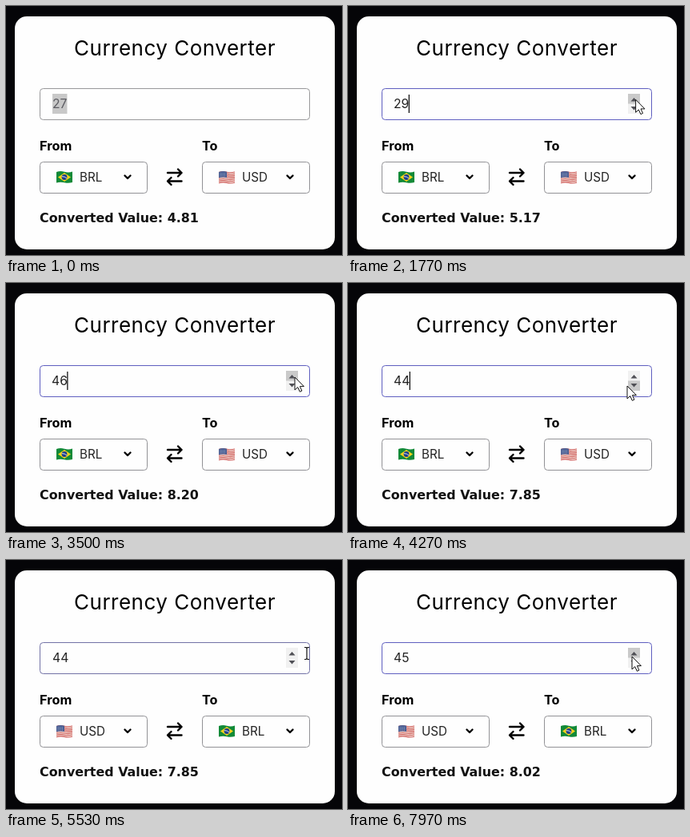
Animation, 420 px wide and 312 px high, one loop 8000 ms. Source, as an HTML page:

```html
<!DOCTYPE html>
<html lang="en">
<head>
<meta charset="utf-8">
<title>Currency Converter</title>
<style>
  html, body { margin: 0; width: 100%; height: 100%; overflow: hidden; background: #050508; }
  svg { display: block; width: 420px; height: 312px; }
  text { font-family: Inter, "Open Sans", sans-serif; fill: #111; white-space: pre; }
  .title { font-size: 26px; font-weight: 430; letter-spacing: .5px; text-anchor: middle; fill: #000; }
  .label { font-size: 16.3px; font-weight: 700; fill: #000; }
  .code { font-size: 15.2px; fill: #222; }
  .amount { font-size: 15.7px; }
  .result { font: bold 15.9px "DejaVu Sans", sans-serif; }
  .box { fill: none; stroke: #929296; }
  .line { fill: none; stroke: #000; stroke-width: 2.4; stroke-linecap: round; stroke-linejoin: round; }
</style>
</head>
<body>
<svg viewBox="0 0 420 312">
  <defs>
    <g id="brl">
      <path d="M0 1Q5 -1 10 .7T20 .5V14Q15 15.5 10 14.3T0 14.5Z" fill="#128a38"/>
      <path d="M2 7.5L10 2L18 7.5L10 13Z" fill="#f8d21c"/>
      <circle cx="10" cy="7.5" r="3.4" fill="#1d3f8c"/>
      <path d="M6.9 6.6Q10.5 6.4 13 9" fill="none" stroke="#f2f2f2" stroke-width=".9"/>
    </g>
    <g id="usd">
      <path d="M0 1Q5 -1 10 .7T20 .5V14Q15 15.5 10 14.3T0 14.5Z" fill="#f3e4dc"/>
      <g id="stripes" fill="none" stroke="#cf5a58" stroke-width="1.15"></g>
      <path d="M0 1Q5 -1 10 .7V8Q5 7 0 8.3Z" fill="#4a5f94"/>
      <path d="M1.5 2.8H9M1.5 4.6H9M1.5 6.4H9" stroke="#c3cbdc" stroke-width=".7" stroke-dasharray=".8 1.1"/>
    </g>
  </defs>

  <rect width="420" height="312" fill="#050508"/>
  <rect x="11" y="13" width="400" height="292" rx="15" fill="#fefefe"/>
  <text class="title" x="211" y="62">Currency Converter</text>

  <rect id="field" class="box" x="42.5" y="103.5" width="337" height="39" rx="4"/>
  <rect id="mark" y="110" height="25"/>
  <text id="amount" class="amount" y="128"></text>
  <path id="caret" d="M0 111V134" stroke="#000" stroke-width="1.2"/>

  <g id="spinner">
    <rect x="350" y="110" width="15" height="25" fill="#f1f1f1"/>
    <rect id="hover" x="350" width="15" height="12.5" fill="#cacaca"/>
    <path d="M353.5 119.5L357.5 115L361.5 119.5ZM353.5 126L357.5 130.5L361.5 126Z" fill="#505056"/>
  </g>

  <text class="label" x="42" y="181">From</text>
  <text class="label" x="245" y="181">To</text>

  <g id="from">
    <rect class="box" x="42.5" y="195.5" width="134" height="39" rx="4"/>
    <use x="63" y="207"/>
    <text class="code" x="92" y="220"></text>
    <path class="line" d="M148.5 212.5L152 216L155.5 212.5"/>
  </g>
  <g id="to" transform="translate(203 0)">
    <rect class="box" x="42.5" y="195.5" width="134" height="39" rx="4"/>
    <use x="63" y="207"/>
    <text class="code" x="92" y="220"></text>
    <path class="line" d="M148.5 212.5L152 216L155.5 212.5"/>
  </g>

  <path class="line" d="M202 209H219.5M215 204.5L219.5 209L215 213.5M219.5 219.5H202M206.5 215L202 219.5L206.5 224"/>
  <text id="result" class="result" x="42" y="271"></text>

  <g id="pointer">
    <path id="arrow" d="M0 0V16L3.7 12.6L6.3 18.3L8.9 17.1L6.4 11.6H11.4Z" fill="#fff" stroke="#111"/>
    <path id="beam" d="M-3 -7.5H-1L0 -6.5L1 -7.5H3M0 -6.5V6.5M-3 7.5H-1L0 6.5L1 7.5H3" fill="none" stroke="#111" stroke-width="1.2"/>
    <path id="hand" d="M-1.5 1Q0 -1 1.5 1V6L8 7.5Q10 8 9.5 11L8 17H0L-5 10Q-5 8 -3.5 8.5L-1.5 10Z" fill="#fff" stroke="#111"/>
  </g>
</svg>
<script>
const LOOP = 8000;
const RATE = 0.1783;
const ACTIVE = 450, SWAP = 4850, REFOCUS = 6230, BLINK = 530;
const $ = id => document.getElementById(id);
const show = (el, on) => el.setAttribute("visibility", on ? "visible" : "hidden");

// Spinner presses: [time, step]
const presses = [
  ...Array.from({ length: 5 }, (_, i) => [1500 + i * 200, 1]),
  ...Array.from({ length: 14 }, (_, i) => [2570 + i * 70, 1]),
  [3800, -1], [4050, -1], [REFOCUS, 1]
];

// Pointer stops: [time, x, y]
const stops = [
  [350, 432, 66], [1000, 361, 111.5], [1150, 361, 111.5], [1400, 359, 117],
  [2400, 361, 118], [3520, 361, 118], [3720, 354, 127], [4050, 352, 128],
  [4270, 349, 129], [4700, 210, 214], [4980, 210, 214], [5450, 376, 117],
  [5570, 376, 117], [5950, 354, 122.5], [6750, 354, 122.5], [7700, 355, 121]
];

for (let y = 1.2; y < 15; y += 2.2) {
  const stripe = document.createElementNS("http://www.w3.org/2000/svg", "path");
  stripe.setAttribute("d", `M0 ${y + 0.3}Q5 ${y - 1.2} 10 ${y}T20 ${y - 0.2}`);
  $("stripes").append(stripe);
}

function pointerAt(t) {
  const i = stops.findIndex(s => s[0] > t);
  if (i === 0) return stops[0].slice(1);
  if (i < 0) return stops[stops.length - 1].slice(1);
  const [t0, x0, y0] = stops[i - 1], [t1, x1, y1] = stops[i];
  const p = (t - t0) / (t1 - t0), k = p * p * (3 - 2 * p);
  return [x0 + (x1 - x0) * k, y0 + (y1 - y0) * k];
}

const within = (x, y, l, t, r, b) => x >= l && x <= r && y >= t && y <= b;

function setCurrency(id, code) {
  $(id).querySelector("use").setAttribute("href", "#" + code.toLowerCase());
  $(id).querySelector("text").textContent = code;
}

function drawAmount(t, focused) {
  const done = presses.filter(p => p[0] <= t);
  const value = done.reduce((sum, p) => sum + p[1], 27);
  const left = focused ? 57 : 58;
  const selected = !done.length;
  const text = $("amount");
  text.textContent = value;
  text.setAttribute("x", left);
  text.style.fill = !selected ? "#222" : focused ? "#f8f8fa" : "#5c5c62";
  const width = text.getComputedTextLength();

  show($("mark"), selected);
  $("mark").setAttribute("x", left);
  $("mark").setAttribute("width", width);
  $("mark").setAttribute("fill", focused ? "#2c68ae" : "#c8c8c8");

  const since = selected ? 0 : t - done[done.length - 1][0];
  show($("caret"), focused && !selected && Math.floor(since / BLINK) % 2 === 0);
  $("caret").setAttribute("transform", `translate(${left + width} 0)`);
  $("result").textContent = "Converted Value: " + (value * RATE).toFixed(2);
}

function drawPointer(t, focused) {
  const [x, y] = pointerAt(t);
  const inField = within(x, y, 42, 103, 380, 143);
  const onSpinner = within(x, y, 348.5, 113, 366, 135);
  const onSwap = within(x, y, 196, 200, 224, 228);

  $("pointer").setAttribute("transform", `translate(${x} ${y})`);
  show($("arrow"), !onSwap && (!inField || onSpinner));
  show($("beam"), inField && !onSpinner);
  show($("hand"), onSwap);

  const spinner = focused || inField;
  show($("spinner"), spinner);
  show($("hover"), spinner && onSpinner);
  $("hover").setAttribute("y", y < 123.5 ? 110 : 122.5);
  $("field").style.stroke = focused ? "#5f5fc0" : inField ? "#7272a6" : "#98989a";
}

function draw(t) {
  const focused = (t >= ACTIVE && t < SWAP) || t >= REFOCUS;
  const swapped = t >= SWAP;
  setCurrency("from", swapped ? "USD" : "BRL");
  setCurrency("to", swapped ? "BRL" : "USD");
  drawAmount(t, focused);
  drawPointer(t, focused);
}

const start = performance.now();
function tick() {
  draw((performance.now() - start) % LOOP);
  requestAnimationFrame(tick);
}
tick();
</script>
</body>
</html>
```
